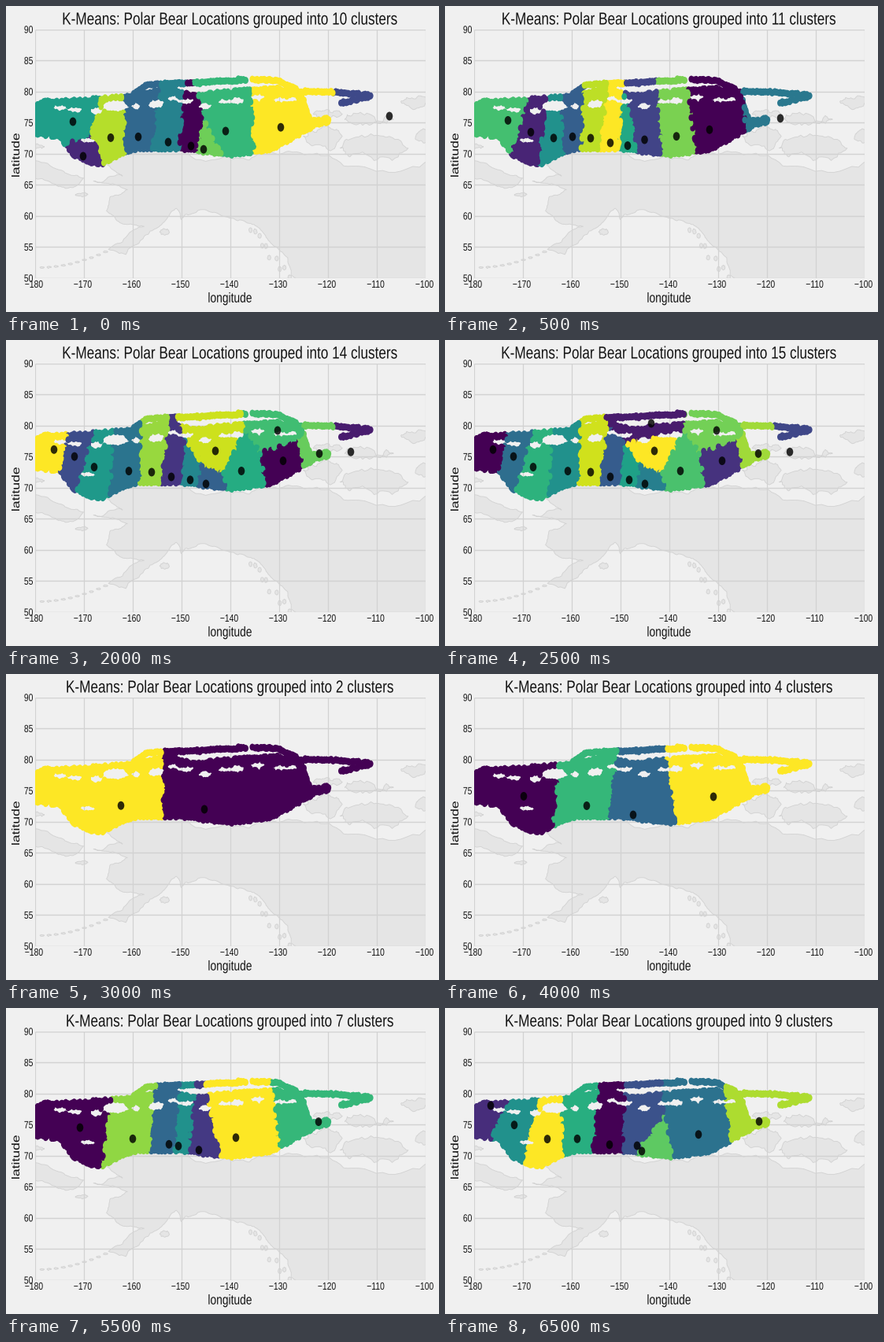
Animation of 550x389 px, one loop 7 s. Source, as a matplotlib script:

```python
import numpy as np
import matplotlib.pyplot as plt
from matplotlib.animation import FuncAnimation
from matplotlib.collections import EllipseCollection
from matplotlib.patches import PathPatch, Polygon
from matplotlib.textpath import TextPath
from matplotlib.transforms import Affine2D

W, H, DPI = 550, 389, 100
LEFT, RIGHT, TOP, BOTTOM = 36.5, 532.6, 29.7, 345.8
KX, KY = (RIGHT - LEFT) / 80, (BOTTOM - TOP) / 40   # pixels per degree
SQUASH = KX / KY          # the whole figure is narrowed by this factor
BACK, LAND, COAST, GRID = "#f0f0f0", "#e5e5e5", "#d3d3d3", "#d2d2d2"

fig = plt.figure(figsize=(W / DPI, H / DPI), dpi=DPI, facecolor=BACK)
ax = fig.add_axes([LEFT / W, 1 - BOTTOM / H, (RIGHT - LEFT) / W, (BOTTOM - TOP) / H])
ax.axis("off")


def geo(px):
    """Stage pixels to longitude and latitude."""
    p = np.array(px, float).reshape(-1, 2)
    return np.column_stack([-180 + (p[:, 0] - LEFT) / KX, 90 - (p[:, 1] - TOP) / KY])


# ---------------------------------------------------------------- base map
MAINLAND = [
    (-95, 49), (-127.5, 50.5), (-130.5, 55), (-134.5, 58.3), (-139.7, 59.6),
    (-146, 61), (-150, 59.4), (-151, 61.2), (-154, 58.6), (-158.4, 56),
    (-164.9, 54.6), (-157.6, 58.3), (-162, 58.7), (-165.3, 60.8), (-164.5, 63.1),
    (-161, 64.2), (-168, 65.6), (-162, 66.4), (-166.5, 68.5), (-156.6, 71.2),
    (-141, 69.6), (-136, 69), (-128, 70.4), (-115, 68), (-95, 67.8),
]
WEST = [(-185, 69.3), (-175, 67.4), (-170, 66.1), (-173, 64.5), (-178.5, 66), (-185, 64.5)]
# islands: centre and half size
ISLANDS = [
    (-121, 72.8, 4, 1.6), (-110.5, 70.9, 7, 2), (-111.5, 75.5, 5, .9),
    (-120, 76.4, 3, .7), (-101, 78.4, 4, .9), (-99.5, 72.8, 2.5, 1.1),
    (-180, 71.1, 2, .35), (-170.4, 63.4, 1.3, .25), (-153.4, 57.4, 1, .5),
]
coast_rng = np.random.default_rng(3)


def fractal(pts, levels=4, amp=.07):
    """Roughen a closed outline by moving the middle of every segment."""
    p = np.array(pts, float)
    for _ in range(levels):
        q = np.roll(p, -1, axis=0)
        side = (q - p)[:, ::-1] * (-1, 1)
        mid = (p + q) / 2 + side * coast_rng.normal(0, amp, (len(p), 1))
        p = np.stack([p, mid], axis=1).reshape(-1, 2)
    return p


def island(x, y, a, b, levels=3):
    t = np.arange(8) * np.pi / 4
    return fractal(np.column_stack([x + a * np.cos(t), y + b * np.sin(t)]), levels, .15)


shapes = [fractal(MAINLAND), fractal(WEST)] + [island(*i) for i in ISLANDS]
for u in np.linspace(0, 1, 10):
    # island chain in the west, then the broken coast in the south-east
    shapes.append(island(-178.5 + 13 * u, 51.7 + 2.5 * u ** 1.8, .45, .13, 1))
    dx, dy = coast_rng.normal(0, .35, 2)
    shapes.append(island(-135.8 + 7.5 * u + dx, 58 - 7.5 * u + dy, .35, .4, 1))
for s in shapes:
    ax.add_patch(Polygon(s, fc=LAND, ec=COAST, lw=.65, zorder=1))

lons, lats = range(-180, -99, 10), range(50, 91, 5)
ax.vlines(lons, 50, 90, color=GRID, lw=.9, zorder=2)
ax.hlines(lats, -180, -100, color=GRID, lw=1.05, zorder=2)

# ---------------------------------------------------------------- locations
UPPER = [(30, 129), (46, 121), (120, 117), (165, 113), (205, 104), (240, 113), (280, 108),
         (345, 104), (375, 108), (386, 141), (394, 146), (405, 141), (413, 146)]
LOWER = [(30, 163), (68, 167), (86, 190), (107, 200), (121, 203), (145, 189), (170, 182),
         (215, 182), (285, 190), (335, 184), (375, 163), (394, 151), (413, 148)]
TRACKS = [
    [(163, 111), (178, 100), (235, 98), (305, 94)],
    [(314, 93), (345, 95), (368, 105)],
    [(370, 109), (412, 109), (463, 114), (426, 124)],
]
GAPS = [(139, 127, 18, 10), (104, 171, 12, 6), (190, 127, 12, 6)]
rng = np.random.default_rng(11)


def along(line, x):
    return np.interp(x, *np.array(line, float).T)


def cloud(step=2.5):
    gx, gy = np.meshgrid(np.arange(30, 414, step), np.arange(100, 204, step))
    x, y = (g.ravel() + rng.uniform(-1.1, 1.1, g.size) for g in (gx, gy))
    keep = (y > along(UPPER, x)) & (y < along(LOWER, x))
    gaps = list(GAPS)
    # small seeded gaps below the upper edge, where the paths are sparse
    for cx in np.linspace(70, 365, 14) + rng.uniform(-9, 9, 14):
        gaps.append((cx, along(UPPER, cx) + rng.uniform(9, 18),
                     rng.uniform(8, 14), rng.uniform(5.5, 7)))
    for cx, cy, a, b in gaps:
        keep &= ((x - cx) / a) ** 2 + ((y - cy) / b) ** 2 > 1
    parts = [np.column_stack([x, y])[keep]]
    for tr in np.array(TRACKS, dtype=object):
        tr = np.array(tr, float)
        dist = np.r_[0, np.cumsum(np.hypot(*np.diff(tr, axis=0).T))]
        d = np.arange(0, dist[-1], 1.6)
        line = np.column_stack([np.interp(d, dist, tr[:, i]) for i in (0, 1)])
        parts.append(line + rng.normal(0, .6, line.shape))
    return rng.permutation(geo(np.vstack(parts)))


dots = cloud()

# ---------------------------------------------------------------- clusters
# Most centres lie on one ridge, so their x is enough; the rest are (x, y).
# Label order gives the colour.
RIDGE = [(60, 139), (85, 147), (110, 161), (135, 168), (165, 166), (185, 168), (210, 174),
         (235, 178), (254, 183), (279, 159), (297, 167), (345, 155), (400, 144), (487, 140)]
CENTRES = {
    2: [(252, 172), 146],
    5: [239, 180, 341, 100, -60],
    7: [94, 245, 207, 219, 397, 161, 292],
    9: [209, (58, 124), (244, 175), 322, 88, 168, 250, 399, 130],
    10: [235, (98, 191), 487, 168, 206, 85, 279, 251, 133, 349],
    12: [210, 336, 109, (252, 158), 162, 426, 138, 232, 80, 294, 185, 255],
    14: [352, 438, 210, 87, 254, 156, 234, 112, 299, (345, 115), 398, 185, (266, 141), 61],
}


def place(c):
    return c if isinstance(c, tuple) else (c, along(RIDGE, c))


def merged(c):
    """Join the two closest centres and shift the labels."""
    gap = np.hypot(*(c[:, None] - c[None]).transpose(2, 0, 1))
    np.fill_diagonal(gap, np.inf)
    a, b = sorted(np.unravel_index(gap.argmin(), gap.shape))
    c = c.copy()
    c[a] = (c[a] + c[b]) / 2
    return np.roll(np.delete(c, b, axis=0), -1, axis=0)


centres = {k: geo([place(c) for c in row]) for k, row in CENTRES.items()}
centres[4] = np.roll(centres[5][:4], 1, axis=0)
for k in (3, 6, 8, 11, 13):
    centres[k] = merged(centres[k + 1])
centres[15] = np.roll(np.vstack([centres[14], geo([262, 106])]), 2, axis=0)

viridis = plt.get_cmap("viridis")


def circles(d, pts, **kw):
    c = EllipseCollection([d], [d], [0], units="xy", offsets=pts,
                          offset_transform=ax.transData, linewidths=0, **kw)
    ax.add_collection(c, autolim=False)
    return c


cover = circles(1.1, dots, zorder=3)
marks = circles(1.38, centres[10], zorder=4, facecolors=[(0, 0, 0, .82)])
ax.set_xlim(-180, -100)
ax.set_ylim(50, 90)


# ---------------------------------------------------------------- text
def glyphs(text, size, x, y, align=.5, turn=0):
    path = TextPath((0, 0), text, size=size, prop={"family": "Liberation Sans"})
    box = path.get_extents()
    shift = -(box.x0 + align * box.width)
    spot = Affine2D().translate(shift, 0).rotate_deg(turn)
    return spot.scale(SQUASH, 1).translate(x, H - y).transform_path(path)


def write(*args, **kw):
    patch = PathPatch(glyphs(*args, **kw), fc="#141414", lw=0, transform=Affine2D())
    return fig.add_artist(patch)


def heading(k):
    return f"K-Means: Polar Bear Locations grouped into {k} clusters", 21.9, 284.6, 23.5


for v in lons:
    write(f"\u2212{-v}", 13.2, LEFT + (v + 180) * KX - 1, 358)
for v in lats:
    write(str(v), 13.2, 34, TOP + (90 - v) * KY + 4.7, align=1)
write("longitude", 17.6, 284.6, 376.7)
write("latitude", 17.6, 17, 189.5, turn=90)
title = write(*heading(10))


# ---------------------------------------------------------------- motion
def update(i):
    k = 2 + (i + 8) % 14
    c = centres[k]
    label = ((dots[:, None] - c[None]) ** 2).sum(axis=2).argmin(axis=1)
    cover.set_facecolor(viridis(label / (k - 1)))
    marks.set_offsets(c)
    title.set_path(glyphs(*heading(k)))
    return cover, marks, title


anim = FuncAnimation(fig, update, frames=14, interval=500, repeat=True, repeat_delay=0)
plt.show()
```
